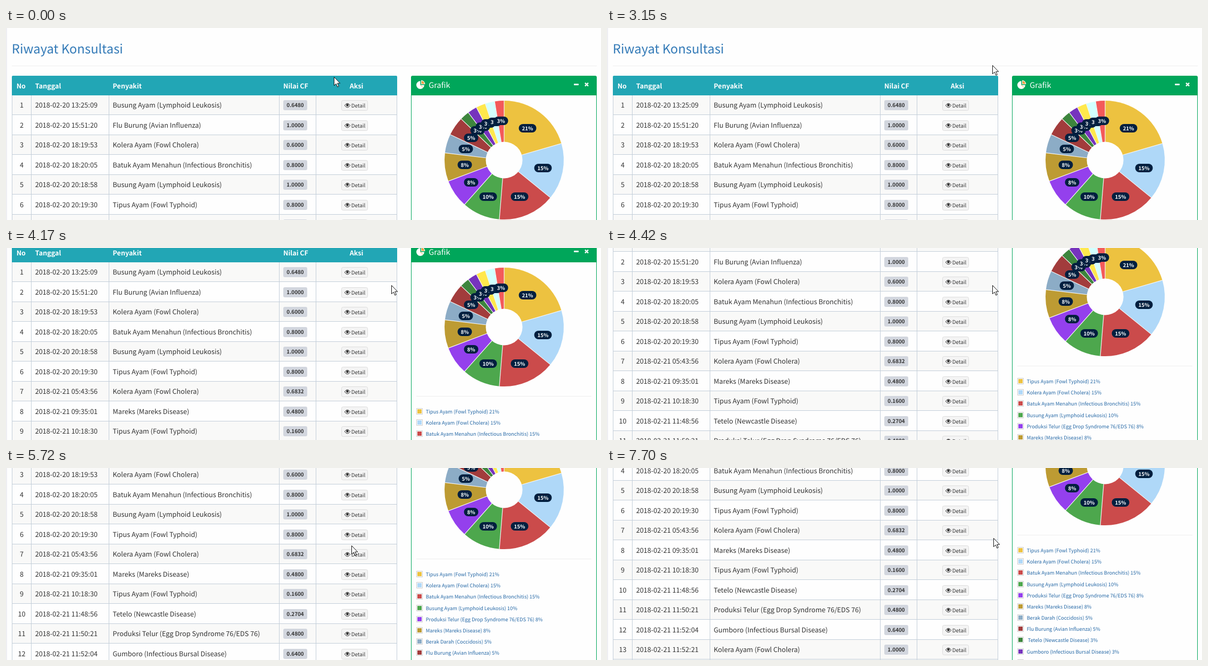
Write an HTML page with a canvas that moves like this. It is 1118 px wide and 362 px high and loops after 8000 ms.

```html
<!DOCTYPE html>
<html lang="id">
<head>
<meta charset="utf-8">
<title>Riwayat Konsultasi</title>
<style>
html, body { margin: 0; width: 100%; height: 100%; overflow: hidden; background: #fefefe; }
canvas { display: block; width: 1118px; height: 362px; }
</style>
</head>
<body>
<canvas id="stage" width="1118" height="362"></canvas>
<script>
const ctx = document.getElementById('stage').getContext('2d');
const W = 1118, H = 362, LOOP = 8000, TAU = Math.PI * 2;
const FAMILY = '"Noto Sans CJK JP", "Noto Sans CJK SC", "Noto Sans CJK", "Noto Sans", sans-serif';
const ROW_H = 37.5;
const INK = '#333', LINE = '#c3ced9', BLUE = '#337ab7', GREEN = '#00a65a', PAGE = '#fefefe';

const busung = 'Busung Ayam (Lymphoid Leukosis)';
const flu = 'Flu Burung (Avian Influenza)';
const kolera = 'Kolera Ayam (Fowl Cholera)';
const batuk = 'Batuk Ayam Menahun (Infectious Bronchitis)';
const tipus = 'Tipus Ayam (Fowl Typhoid)';
const mareks = 'Mareks (Mareks Disease)';
const tetelo = 'Tetelo (Newcastle Disease)';
const telur = 'Produksi Telur (Egg Drop Syndrome 76/EDS 76)';
const gumboro = 'Gumboro (Infectious Bursal Disease)';

const rows = [
  ['20 13:25:09', busung, '0.6480'],
  ['20 15:51:20', flu, '1.0000'],
  ['20 18:19:53', kolera, '0.6000'],
  ['20 18:20:05', batuk, '0.8000'],
  ['20 20:18:58', busung, '1.0000'],
  ['20 20:19:30', tipus, '0.8000'],
  ['21 05:43:56', kolera, '0.6832'],
  ['21 09:35:01', mareks, '0.4800'],
  ['21 10:18:30', tipus, '0.1600'],
  ['21 11:48:56', tetelo, '0.2704'],
  ['21 11:50:21', telur, '0.4800'],
  ['21 11:52:04', gumboro, '0.6400'],
  ['21 11:52:21', kolera, '1.0000']
];

// cases, colour, legend label
const slices = [
  [8, '#edc240', tipus],
  [6, '#afd8f8', kolera],
  [6, '#cb4b4b', batuk],
  [4, '#4da74d', busung],
  [3, '#9440ed', telur],
  [3, '#bd9b33', mareks],
  [2, '#8cacc6', 'Berak Darah (Coccidosis)'],
  [2, '#a23c3c', flu],
  [1, '#3d853d', '\u00a0' + tetelo],
  [1, '#7633bd', gumboro],
  [1, '#ffe84c', ''],
  [1, '#d2ffff', ''],
  [1, '#f35a5a', '']
];
const total = slices.reduce((sum, [n]) => sum + n, 0);
const percent = n => Math.round(n / total * 100) + '%';

// pointer strokes: first step, last step, bend, end
const strokes = [
  [910, 1660, [810, 150], [527, 146]],
  [1730, 2130, [1280, 80], [783, 121]],
  [2680, 2900, [756, 92], [738, 74]],
  [3080, 3150, [731, 72], [724, 70]],
  [4850, 5090, [664, 66], [600, 56]],
  [5270, 5570, [700, 100], [649, 146]],
  [5820, 6120, [618, 155], [618, 154]],
  [6360, 6440, [598, 165], [577, 175]],
  [6890, 7700, [620, 265], [726, 132]]
];

const clamp = u => Math.max(0, Math.min(1, u));
const easeOut = (u, power) => 1 - (1 - clamp(u)) ** power;

const held = (t, first, step) => t < first ? 0 : first + Math.floor((t - first) / step + 1e-6) * step;

// four wheel notches, then a short glide to the end of the page
function scrollAt(t) {
  const wheel = held(t, 3793.2, 78.4), glide = held(t, 5720, 80);
  let y = 45 * easeOut((glide - 5740) / 380, 3);
  for (let k = 0; k < 4; k++) y += 52 * easeOut((wheel - 3690 - 242.5 * k) / 232, 2);
  return Math.floor(y);
}

function pointerAt(t) {
  let pos = [616, 92];
  for (const [start, end, bend, to] of strokes) {
    if (t < start) break;
    const count = Math.round((end - start) / 75);
    const u = clamp((Math.floor((t - start) / (end - start) * count + 1e-6) + 1) / (count + 1));
    pos = pos.map((p, k) => (1 - u) ** 2 * p + 2 * u * (1 - u) * bend[k] + u * u * to[k]);
  }
  return pos.map(Math.round);
}

function rect(x, y, w, h, color) {
  ctx.fillStyle = color;
  ctx.fillRect(x, y, w, h);
}

function rounded(x, y, w, h, r, fill, stroke) {
  ctx.beginPath();
  ctx.roundRect(x, y, w, h, r);
  ctx.fillStyle = fill;
  ctx.fill();
  if (stroke) {
    ctx.strokeStyle = stroke;
    ctx.lineWidth = 1;
    ctx.stroke();
  }
}

function text(str, x, y, size, color, weight = 400, align = 'left') {
  ctx.font = `${weight} ${size}px ${FAMILY}`;
  ctx.textAlign = align;
  ctx.fillStyle = color;
  ctx.fillText(str, x, y);
}

function eye(x, y) {
  ctx.strokeStyle = INK;
  ctx.lineWidth = 1;
  ctx.beginPath();
  ctx.moveTo(x - 5.2, y);
  ctx.quadraticCurveTo(x, y - 7.6, x + 5.2, y);
  ctx.quadraticCurveTo(x, y + 7.6, x - 5.2, y);
  ctx.stroke();
  wedge(x, y - 0.6, 2.4, 0, TAU, INK);
}

function table(px, py) {
  const lineY = i => Math.floor(126 + ROW_H * i);
  rows.forEach(([time, name, cf], i) => {
    const mid = Math.round(146 + ROW_H * i), base = mid + 4;
    rect(11, lineY(i), 724, ROW_H + 1, i % 2 ? PAGE : '#f9f9f8');
    rect(11, lineY(i), 724, 1, LINE);
    text(i + 1, 29.5, base, 12.7, INK, 400, 'center');
    text('2018-02-' + time, 54.7, base, 12.7, INK);
    text(name, 200.5, base, 12.7, INK);
    rounded(521, mid - 10, 45, 19, 3, '#d2d6de');
    text(cf, 543.5, mid + 3, 9.9, INK, 700, 'center');
    const hover = px >= 630 && px < 680 && Math.abs(py - mid) < 10;
    rounded(630.5, mid - 9.5, 49, 19, 3, hover ? '#e7e7e7' : '#f4f4f4', hover ? '#adadad' : '#ddd');
    eye(641.5, mid);
    text('Detail', 648.8, base, 9.8, INK);
  });
  const bottom = lineY(rows.length);
  rect(11, bottom, 724, 1, LINE);
  for (const x of [11, 47, 193, 513, 582, 734]) rect(x, 127, 1, bottom - 100, LINE);

  const head = (str, x, align) => text(str, x, 114, 12.6, '#fff', 700, align);
  rounded(11, 90, 724, 37, [2, 2, 0, 0], '#22a6b5');
  head('No', 28.3, 'center');
  head('Tanggal', 54.8);
  head('Penyakit', 200.5);
  head('Nilai CF', 521);
  head('Aksi', 658.5, 'center');
}

function wedge(x, y, r, from, to, color) {
  ctx.beginPath();
  ctx.moveTo(x, y);
  ctx.arc(x, y, r, from, to);
  ctx.closePath();
  ctx.fillStyle = color;
  ctx.fill();
}

function donut(cx, cy) {
  const angle = n => n / total * TAU - TAU / 4;
  const labels = [];
  let sum = 0;
  for (const [n, color] of slices) {
    wedge(cx, cy, 112, angle(sum), angle(sum + n), color);
    labels.push([percent(n), angle(sum + n / 2), angle(sum)]);
    sum += n;
  }
  ctx.strokeStyle = '#f4f4f4';
  ctx.lineWidth = 1.2;
  for (const [, , a] of labels) {
    ctx.beginPath();
    ctx.moveTo(cx, cy);
    ctx.lineTo(cx + 112.5 * Math.cos(a), cy + 112.5 * Math.sin(a));
    ctx.stroke();
  }
  wedge(cx, cy, 34.5, 0, TAU, PAGE);
  for (const [label, a] of labels) {
    const x = Math.round(cx - 0.3 + 74.5 * Math.cos(a)), y = Math.round(cy + 74.5 * Math.sin(a));
    const w = label.length > 2 ? 33 : 27;
    rounded(x - w / 2, y - 8, w, 16, 8, '#001f3f');
    text(label, x, y + 3.7, 9.7, '#fff', 700, 'center');
  }
}

function panel() {
  rect(761, 120, 1, 700, GREEN);
  rect(1109, 120, 1, 700, GREEN);
  rounded(761, 90, 349, 37, [3, 3, 0, 0], GREEN);
  wedge(778.5, 107.5, 7.5, 0, TAU * 0.75, '#fff');
  wedge(780, 106, 7.5, -TAU / 4, 0, '#fff');
  wedge(780.8, 105.2, 5.4, -TAU / 4, 0, '#f0a040');
  ctx.strokeStyle = '#f0b050';
  ctx.lineWidth = 1;
  ctx.beginPath();
  ctx.moveTo(778.5, 107.5);
  ctx.lineTo(784, 112.5);
  ctx.stroke();
  text('Grafik', 794.3, 113, 14.5, '#fff');
  rounded(1067, 105, 9, 3, 1, '#fff');
  ctx.strokeStyle = '#fff';
  ctx.lineWidth = 2.4;
  ctx.beginPath();
  for (const s of [-1, 1]) {
    ctx.moveTo(1088, 106.5 - 3 * s);
    ctx.lineTo(1094, 106.5 + 3 * s);
  }
  ctx.stroke();

  donut(936, 249);
  rect(771, 379, 329, 1, '#eee');
  slices.forEach(([n, color, label], i) => {
    const y = Math.round(408 + 21.17 * i);
    rounded(771.5, y - 5.5, 11, 11, 0, '#fff', '#ccc');
    rect(773, y - 4, 8, 8, color);
    if (label) text(`${label} ${percent(n)}`, 788.7, y + 4, 9.35, '#2568a6');
  });
}

function pointer(x, y) {
  const shape = [[0, 0], [0, 16], [3.7, 12.6], [6.3, 18.6], [8.8, 17.5], [6.2, 11.7], [11.2, 11.7]];
  ctx.beginPath();
  for (const [dx, dy] of shape) ctx.lineTo(x + 0.5 + dx, y + 0.5 + dy);
  ctx.closePath();
  ctx.fillStyle = '#fff';
  ctx.fill();
  ctx.strokeStyle = '#111';
  ctx.lineWidth = 1;
  ctx.stroke();
}

function draw(t) {
  const scroll = scrollAt(t);
  const [px, py] = pointerAt(t);
  rect(0, 0, W, H, PAGE);
  rect(0, 0, 2, H, '#eeeef2');
  ctx.save();
  ctx.translate(0, -scroll);
  text('Riwayat Konsultasi', 10.8, 48, 23.8, BLUE);
  rect(11, 71, 1099, 1, '#eee');
  table(px, py + scroll);
  panel();
  ctx.restore();
  pointer(px, py);
}

ctx.textRendering = 'geometricPrecision';
const begin = performance.now();
function tick() {
  draw((performance.now() - begin) % LOOP);
  requestAnimationFrame(tick);
}
tick();
</script>
</body>
</html>
```
